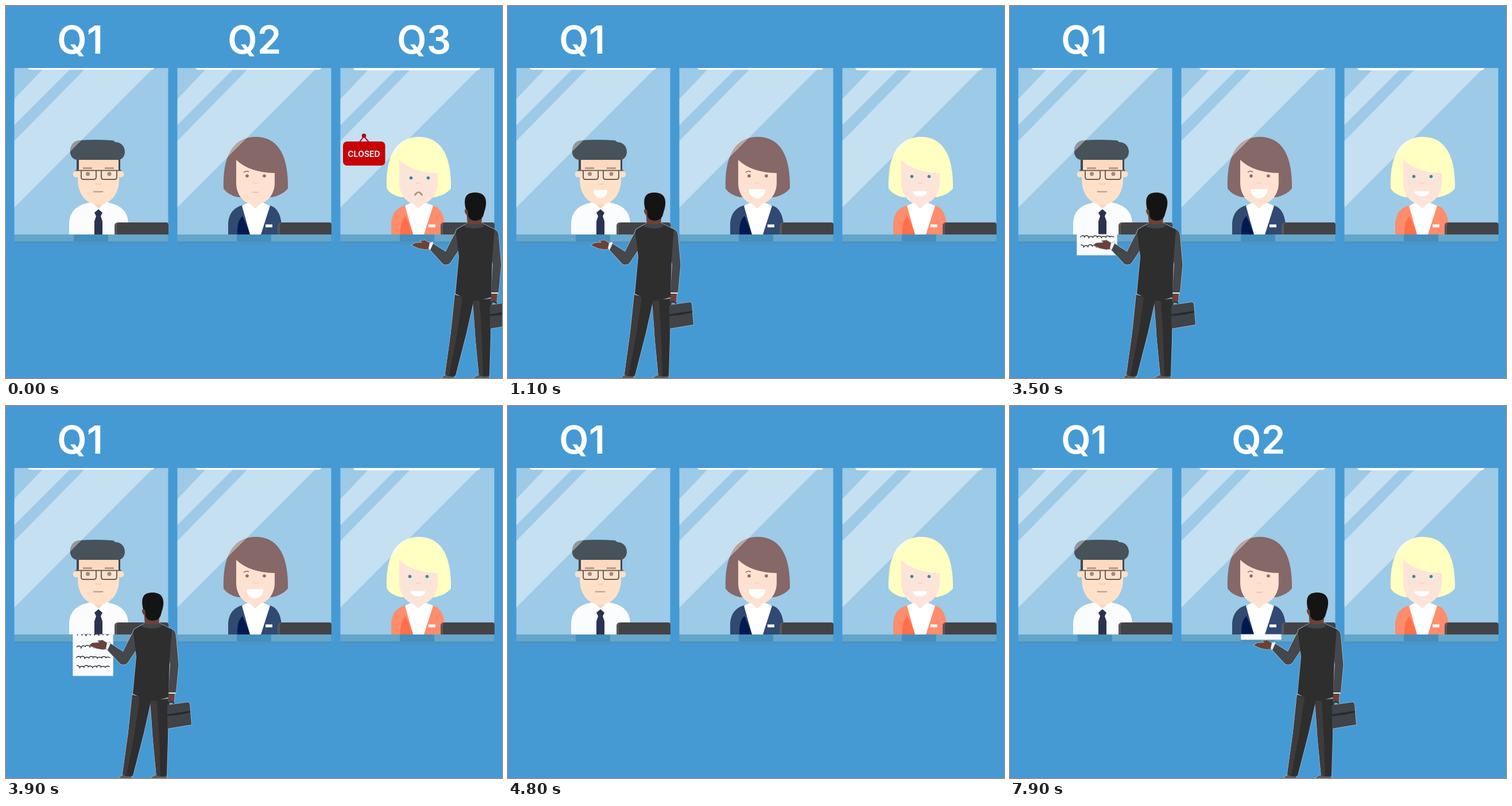
These frames come from a looping animation (864 by 648 pixels, 8 s). An HTML page:

```html
<!DOCTYPE html>
<html lang="en">
<head>
<meta charset="utf-8">
<title>Three counters</title>
<style>
  html, body { margin: 0; width: 100%; height: 100%; overflow: hidden; background: #459ad4; }
  svg { display: block; width: 100vw; height: 100vh; }
  .title { font: 600 67px Inter, Arial, sans-serif; fill: #fff; }
  .sign { font: 700 14px Inter, sans-serif; fill: #d3e9ef; text-anchor: middle; }
</style>
</head>
<body>
<svg id="stage" viewBox="0 0 864 648"></svg>
<script>
const LOOP = 8000;
const PITCH = 284;

const rect = (x, y, w, h, fill, rx = 0) =>
  `<rect x="${x}" y="${y}" width="${w}" height="${h}" fill="${fill}" rx="${rx}"/>`;
const path = (d, fill, more = '') => `<path d="${d}" fill="${fill}" ${more}/>`;
const line = (d, stroke, width, more = '') =>
  path(d, 'none', `stroke="${stroke}" stroke-width="${width}" ${more}`);
const dot = (x, y, r, fill) => `<circle cx="${x}" cy="${y}" r="${r}" fill="${fill}"/>`;
const move = (x, content) => `<g transform="translate(${x})">${content}</g>`;

// Mouth shapes
const smile = (x, y, w, depth) =>
  path(`M${x - w} ${y}a${w} ${depth} 0 0 0 ${2 * w} 0z`, '#fff',
    'stroke="#fff" stroke-width="2" stroke-linejoin="round"');
const bend = (x, y, w, depth, color, width = 2) =>
  line(`M${x - w} ${y}q${w} ${2 * depth} ${2 * w} 0`, color, width, 'stroke-linecap="round"');

const maleClerk = () =>
  path('M147 335H176V350L161 357L147 350Z', '#f9d5bd') +
  path('M110 398V377Q112 347 148 342L161 353L175 342Q211 347 213 377V398Z', '#fafcfd') +
  path('M148 340L161 353L152 363L143 344ZM175 340L161 353L171 363L180 344Z', '#fff') +
  path('M161 354l7 6-3 6 3 9v23h-14v-23l3-9-3-6z', '#2b3350') +
  dot(122, 293, 5.5, '#ffdfc6') + dot(200, 293, 5.5, '#ffdfc6') +
  rect(123, 258, 76, 29, '#42494e') +
  path('M125 286H127V267H196V286H197V302C197 330 180 346 161 346C142 346 125 330 125 302Z', '#ffe1ca') +
  rect(127, 267, 69, 15, '#fdd9c0') +
  path('M124 268C106 267 108 234 128 234Q154 232 184 234Q188 234 190 237C211 237 212 266 196 268Z', '#48525a') +
  rect(134, 281, 16, 3, '#b39a89') + rect(172, 281, 16, 3, '#b39a89') +
  dot(142.5, 292.5, 3.5, '#a48a7c') + dot(180, 292.5, 3.5, '#a48a7c') +
  line('M121 286.5H201M131 287V298Q131 302 135 302H153Q157 302 157 298V287M166 287V298Q166 302 170 302H189Q193 302 193 298V287', '#6d605a', 2) +
  line('M155 309q6 3 12 0', '#f7cdb4', 2) +
  '<g id="mouth0"></g>';

const femaleClerk = (id, { hair, skin, eye, brow, jacket, shade }) =>
  path('M379 318C377 264 394 228 435 228C476 228 492 264 491 318Q482 329 464 333H404Q386 329 379 318Z', hair) +
  path('M387 398V378Q389 353 412 347H458Q477 351 480 380V398Z', jacket) +
  path('M403 398Q402 374 412 366L426 398Z', shade) +
  path('M421 332H448V349L434 358L421 349Z', skin) +
  path('M411 348L423 342L434 353L446 342L460 348L444 398H425Z', '#fff') +
  path('M401 268Q424 290 468 291V310C467 333 450 346 434 346C418 346 402 333 401 310Z', skin) +
  `<g id="eyes${id}">` +
  line('M414 290q4-4 9-1', brow, 1.6) +
  dot(420, 296, 2.8, eye) + dot(450, 296, 2.8, eye) + '</g>' +
  line('M430 308q4 2 8 0', '#f5cfc0', 1.5) +
  rect(452, 380.5, 12, 5, '#fff') +
  `<g id="mouth${id}"></g>`;

const clerks = [
  maleClerk(),
  move(-PITCH, femaleClerk(1, {
    hair: '#856867', skin: '#ffe1d1', eye: '#916f66', brow: '#856867',
    jacket: '#304a71', shade: '#001a51' })),
  move(-PITCH, femaleClerk(2, {
    hair: '#ffffc2', skin: '#fde4d9', eye: '#318ea5', brow: '#fff3c6',
    jacket: '#ff8d6d', shade: '#ff6f4a' })),
];
const lamps = [[38, 220, 3], [46, 219, 3], [37, 221, 4]];

const counter = (clerk, i) => {
  const [x, w, h] = lamps[i];
  return move(i * PITCH,
    rect(14.5, 108, 268, 290, '#9ccae7') + clerk +
    path('M66 108H114L14.5 207.5V162ZM139 108H257L14.5 351V235Z', '#fff', 'opacity=".4"') +
    path(`M${x} 108h${w}q-1 ${h}-5 ${h}H${x + 5}q-4 0-5-${h}`, '#fff') +
    path('M189 398V384Q189 377 196 377H279Q283 377 283 381V398Z', '#434346') +
    path('M189 398V384Q189 377 196 377H198Q193 378 193 384V398Z', '#58585c') +
    rect(14.5, 398, 268, 17, '#4b94c4') +
    rect(14.5, 398, 104, 12, '#64a5ca') + rect(178, 398, 104.5, 12, '#67a7cb') +
    rect(118, 398, 60, 12, '#458fbd'));
};

const customer = () => {
  const skin = '#6c4237', sleeve = '#45474a', suit = '#2e2e2f', shoe = '#595c66';
  const body = [
    ['M197 648Q201 642 208 642H221L218 648ZM252 648Q260 642 265 642H279L280 648Z', shoe],
    ['M220 503L253 512L240 570L221 644Q211 647 203 642L213 570Z', suit],
    ['M251 512L283 510L282 580L280 644Q271 647 262 643L256 580Z', suit],
    ['M281 521L317 516Q319 516 320 519L323 555L281 562Z', '#404347'],
    ['M283 500H294L293 515Q287 519 282 514Z', skin],
    ['M178 414L168 408L160 409L163 412L150 413L145 417L150 419L157 422L168 424L176 423Z', skin],
    ['M176 413L181 411L184 418L178 426L174 422Z', '#f0f2f4'],
    ['M282 497H295V501H282Z', '#f0f2f4'],
    ['M240 352H268L266 383H242Z', skin],
    ['M223 391Q215 405 204 428L182 414L177 425L199 449Q207 453 212 447L226 426Z', sleeve],
    ['M272 385L289 389Q295 391 296 400L300.5 451L296 499H283L286 450Z', sleeve],
    ['M241 379L225 388Q221 390 222 396L227 437L221 501Q238 511 254 513Q270 512 283 507L285 440L289 389L268 379Q255 384 241 379Z', suit],
    ['M239 354C234 333 240 325 255 325C271 325 277 335 273 352L269 366Q265 374 255 374Q245 373 243 366Z', '#141414'],
  ];
  // The pale rim goes under all parts, so it shows only outside the figure.
  return body.map(([d]) => line(d, '#9db9d0', 1.6)).join('') +
    body.map(([d, fill]) => path(d, fill)).join('') +
    path('M221 505L233 508L224 570L210 643L203 642L213 570Z', '#3e3b3b') +
    path('M252 513L263 514L267 580L269 644L262 643L256 580Z', '#3e3b3b') +
    line('M283 521V517Q288 513 293 518', '#303236', 2.5) +
    path('M281 537L321 531V534L301 538L281 540Z', '#27292c') +
    path('M241 378Q255 383 267 378L271 384Q255 391 236 384Z', '#434549') +
    path('M238 354Q235 357 240 364L243 365L242 355Z', skin);
};

const scribble = (y, seed) => {
  let d = '';
  for (let x = 0; x <= 56; x++) {
    const wave = Math.sin(x * 0.85 + seed) * 1.7 + Math.sin(x * 0.31 + seed * 3);
    d += `${x ? 'L' : 'M'}${124 + x + 1.5 * Math.cos(x * 0.85 + seed)} ${y + wave * (1 - x / 110)}`;
  }
  return line(d, '#222', 1.3);
};

// Sheet drawn fully pulled out; its slot clips whatever is still inside.
const sheet = () =>
  rect(116.5, 398, 70, 99, '#f8fafb') +
  line('M116.5 398V497H186.5V398', '#cfd8df', 1) +
  [409, 425, 446, 465, 481].map(scribble).join('');

const closedSign = () =>
  line('M615 238L623.5 227L633 238', '#a80d18', 2) + dot(623.5, 226, 3.8, '#a80d18') +
  rect(587, 236, 73.5, 42, '#c80206', 7) +
  '<text class="sign" x="623.5" y="262.5">CLOSED</text>';

const stage = document.getElementById('stage');
stage.innerHTML =
  '<clipPath id="slot"><rect x="110" y="397.5" width="90" height="110"/></clipPath>' +
  rect(0, 0, 864, 648, '#459ad4') +
  [89, 386, 681].map((x, i) => `<text class="title" x="${x}" y="82.5">Q${i + 1}</text>`).join('') +
  clerks.map(counter).join('') +
  `<g id="sign">${closedSign()}</g>` +
  `<g id="paper"><g clip-path="url(#slot)"><g id="sheet">${sheet()}</g></g></g>` +
  `<g id="customer">${customer()}</g>`;

const el = id => document.getElementById(id);
const titles = stage.querySelectorAll('.title');
const show = (node, visible) => node.setAttribute('visibility', visible ? 'visible' : 'hidden');
const shift = (node, x, y = 0) => node.setAttribute('transform', `translate(${x} ${y})`);
const at = (t, keys) => keys.filter(([start]) => start <= t).pop()[1];

const flat = bend(160.5, 323.5, 8, 0, '#b59a89');
const flatPink = bend(434.5, 324.5, 4.5, 0, '#dcb9ac', 1.6);
const mouths = [
  [[0, flat], [100, smile(161, 321.5, 11, 12)], [1600, smile(161, 321.5, 11, 7)],
   [2100, bend(161, 322, 11, 10, '#b59a89')], [2600, flat]],
  [[0, flatPink], [100, smile(434, 320, 13.5, 14)],
   [6300, bend(434, 324, 13, 4, '#cfa597')],
   [6800, bend(435, 324, 5.5, 3, '#cfa597', 1.6)], [7300, flatPink]],
  [[0, bend(434.5, 329, 6, -4.5, '#b59684', 3.2)], [100, smile(433.5, 323.5, 11.5, 7)]],
];
const customerX = [[0, 562], [100, null], [1100, 0], [4800, null], [5800, 280]];
const titleCount = [[0, 3], [100, 0], [600, 1], [5300, 2]];
// Start time and place of each sheet; null means none
const papers = [[0, null], [3100, { start: 3100, x: 0 }], [4800, null], [7900, { start: 7800, x: 286 }]];

const drawn = [];
function render(t) {
  mouths.forEach((keys, i) => {
    const shape = at(t, keys);
    if (drawn[i] !== shape) el('mouth' + i).innerHTML = drawn[i] = shape;
  });
  const count = at(t, titleCount);
  titles.forEach((title, i) => show(title, i < count));

  const closed = t < 100;
  show(el('sign'), closed);
  shift(el('eyes2'), closed ? 1.5 : -0.5, closed ? 3.5 : 1);

  const x = at(t, customerX);
  show(el('customer'), x !== null);
  shift(el('customer'), x ?? 0);

  const paper = at(t, papers);
  show(el('paper'), paper);
  if (paper) {
    const out = Math.min(99, 9 * Math.floor((t - paper.start) / 100));
    shift(el('paper'), paper.x);
    shift(el('sheet'), 0, out - 99);
  }
}

function tick() {
  render(performance.now() % LOOP);
  requestAnimationFrame(tick);
}
tick();
</script>
</body>
</html>
```
